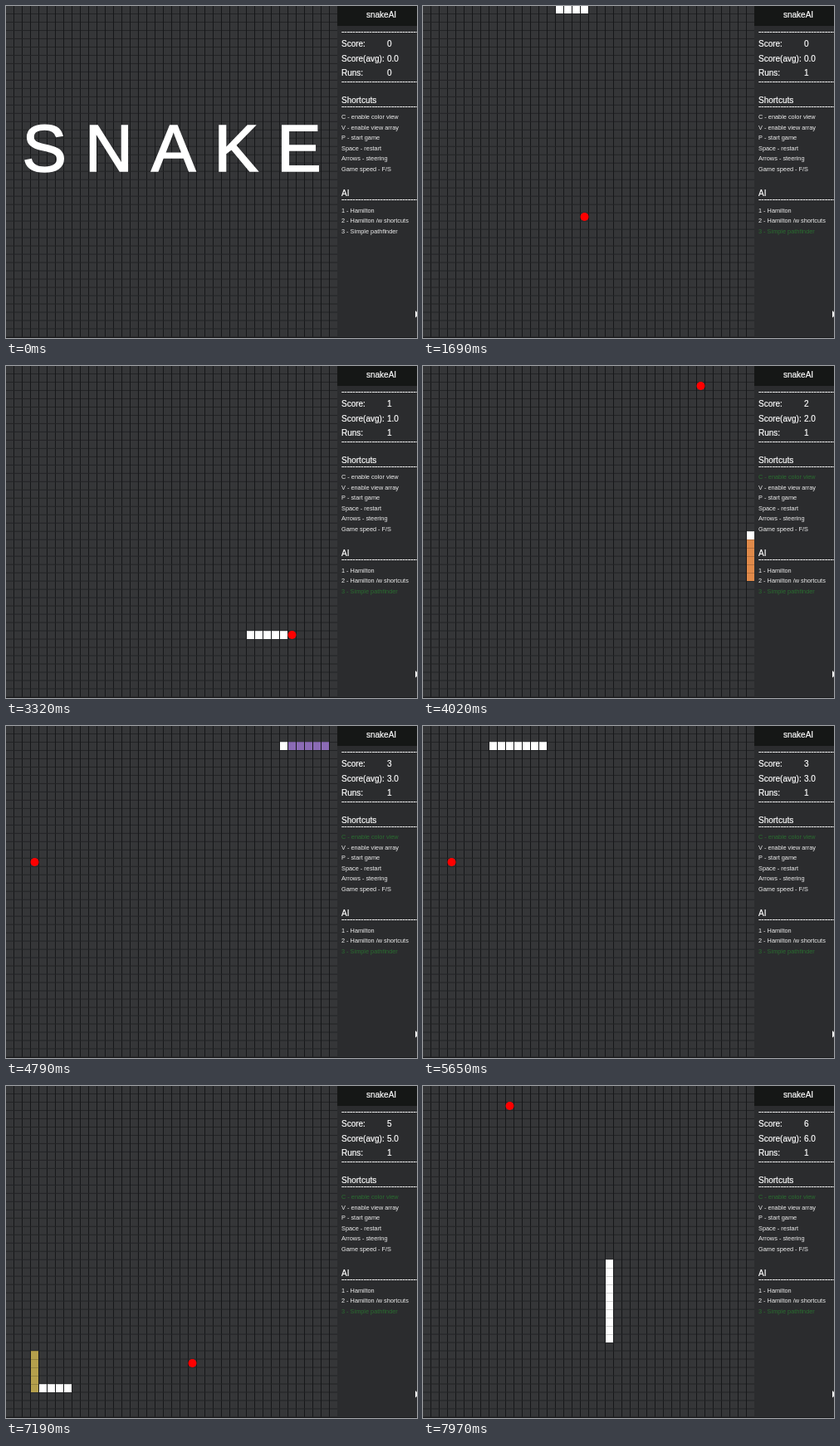
An HTML page that plays this animation: 495x400 px, repeating every 8000 ms.

```html
<!DOCTYPE html>
<html lang="en">
<head>
<meta charset="utf-8">
<title>snakeAI</title>
<style>
html, body { margin: 0; width: 100%; height: 100%; overflow: hidden; background: #2b2c2e; }
svg { display: block; width: 100vw; height: 100vh; }
text {
  font-family: "Liberation Sans", Arial, sans-serif;
  font-kerning: none;
  fill: #fff;
  white-space: pre;
}
</style>
</head>
<body>
<svg id="stage" viewBox="0 0 495 400" preserveAspectRatio="none"></svg>
<script>
const LOOP = 8000, CELLS = 40, CELL = 10, START_LEN = 4;
const stage = document.getElementById('stage');

function add(tag, attrs, parent = stage) {
  const el = document.createElementNS('http://www.w3.org/2000/svg', tag);
  for (const key in attrs) el.setAttribute(key, attrs[key]);
  parent.appendChild(el);
  return el;
}
const rect = (x, y, width, height, fill, parent) => add('rect', { x, y, width, height, fill }, parent);
function label(x, y, size, str, weight = 0) {
  const el = add('text', { x, y, 'font-size': size, stroke: '#fff', 'stroke-width': weight });
  el.textContent = str;
  return el;
}
const setText = (el, str) => { if (el.textContent !== str) el.textContent = str; };

// Left edge of a column, top edge of a row
const colX = c => CELL * c;
const rowY = r => CELL * r - 1;

// Snake route: corners joined by straight runs, measured in cells
const corners = [[0, 0], [19, 0], [19, 32], [39, 32], [39, 2], [3, 2], [3, 36], [22, 36], [22, 20]];
const route = [corners[0]];
for (const [cx, cy] of corners.slice(1)) {
  let [x, y] = route[route.length - 1];
  while (x !== cx || y !== cy) {
    x += Math.sign(cx - x);
    y += Math.sign(cy - y);
    route.push([x, y]);
  }
}

// Food places; "at" is the route index where each is eaten
const foods = [
  { cell: [19, 25], at: 44 },
  { cell: [34, 32], at: 66 },
  { cell: [33, 2], at: 107, tint: '#8b6bb5' },
  { cell: [3, 16], at: 151, tint: '#33807f' },
  { cell: [4, 36], at: 172, tint: '#b5a04c' },
  { cell: [22, 33], at: 193, tint: '#6a9a55' },
  { cell: [10, 2], at: Infinity }
];
const COLOR_ON = 82;
const paints = [{ at: COLOR_ON + 1, tint: '#e08a4a' }, ...foods.filter(f => f.tint)];

// Pace: [step, ms, head index], even in between
const pace = [
  [0, 980, 1], [9, 1690, 19], [10, 1760, 22], [20, 2540, 44], [32, 3470, 69],
  [39, 4020, 83], [43, 4320, 92], [54, 5170, 119], [60, 5650, 132],
  [65, 6040, 142], [70, 6420, 153], [87, 7740, 195], [90, 7970, 205]
];
const steps = [];
pace.forEach(([k, ms, head], i) => {
  const next = pace[i + 1] || [k + 1, ms, head];
  for (let j = k; j < next[0]; j++) {
    const u = (j - k) / (next[0] - k);
    steps.push({
      ms: Math.round((ms + (next[1] - ms) * u) / 10) * 10,
      head: Math.round(head + (next[2] - head) * u)
    });
  }
});

// Board
rect(0, 0, 399, 400, '#353638');
for (let i = 1; i <= CELLS; i++) {
  rect(0, 9.985 * i - 0.985, 399, 1, '#222325');
  rect(colX(i) - 1, 0, 1, 400, '#161719');
}
const title = label(19.4, 198.6, 80, 'S N A K E', 1.6);
const game = add('g', {});
const food = add('circle', { r: 5, fill: '#f00' }, game);
const body = Array.from({ length: START_LEN + foods.length }, () => {
  const g = add('g', {}, game);
  const block = rect(0, 0, 9, 10, '#fff', g);
  rect(0, 0, 9, 1, 'rgba(0,0,0,.18)', g);
  return { g, block };
});

// Side panel
rect(399, 0, 96, 400, '#2b2c2e');
rect(399, 0, 96, 24, '#151716');
rect(0, 399, 495, 1, '#1a1b1d');
const heading = (x, y, str) => label(x, y, 10, str, 0.2);
heading(434, 14, 'snakeAI');
for (const y of [34, 94, 124.3, 236.3]) heading(404, y, '-'.repeat(30));
function stat(y, name) {
  heading(404, y, name);
  return heading(459, y, '0');
}
const score = stat(49, 'Score:');
const average = stat(66.5, 'Score(avg):');
const runs = stat(84, 'Runs:');
function menu(y, name, items) {
  heading(404, y, name);
  return items.map((item, i) => label(404, y + 19.8 + 12.5 * i, 7.35, item));
}
const keys = menu(116.5, 'Shortcuts', [
  'C - enable color view', 'V - enable view array', 'P - start game',
  'Space - restart', 'Arrows - steering', 'Game speed - F/S'
]);
const modes = menu(229, 'AI', ['1 - Hamilton', '2 - Hamilton /w shortcuts', '3 - Simple pathfinder']);
add('path', { d: 'M493 367V375.5L495 373.8V369Z', fill: '#fff' });

const light = (el, on) => { el.style.fill = on ? '#2a6e30' : '#f0f0f0'; };
[...keys, ...modes].forEach(el => light(el, false));

function render(t) {
  let step = null;
  for (const s of steps) if (s.ms <= t) step = s;
  const head = step ? step.head : 0;
  const eaten = foods.filter(f => f.at <= head).length;
  const length = START_LEN + foods.filter(f => f.at < head).length;

  title.style.display = step ? 'none' : '';
  game.style.display = step ? '' : 'none';
  setText(score, String(eaten));
  setText(average, eaten.toFixed(1));
  setText(runs, step ? '1' : '0');
  light(modes[2], step);
  light(keys[0], head >= COLOR_ON);

  const [fx, fy] = foods[eaten].cell;
  food.setAttribute('cx', colX(fx) + 4.5);
  food.setAttribute('cy', rowY(fy) + 5);

  // Everything laid before the latest paint point takes its tint
  const paint = paints.filter(p => p.at <= head).pop();
  body.forEach(({ g, block }, i) => {
    const at = head - i;
    const shown = i < length && at >= 1;
    g.style.display = shown ? '' : 'none';
    if (!shown) return;
    const [x, y] = route[at];
    g.setAttribute('transform', `translate(${colX(x)} ${rowY(y)})`);
    block.setAttribute('fill', paint && at < paint.at ? paint.tint : '#fff');
  });
}

const begin = performance.now();
function tick() {
  render((performance.now() - begin) % LOOP);
  requestAnimationFrame(tick);
}
tick();
</script>
</body>
</html>
```
